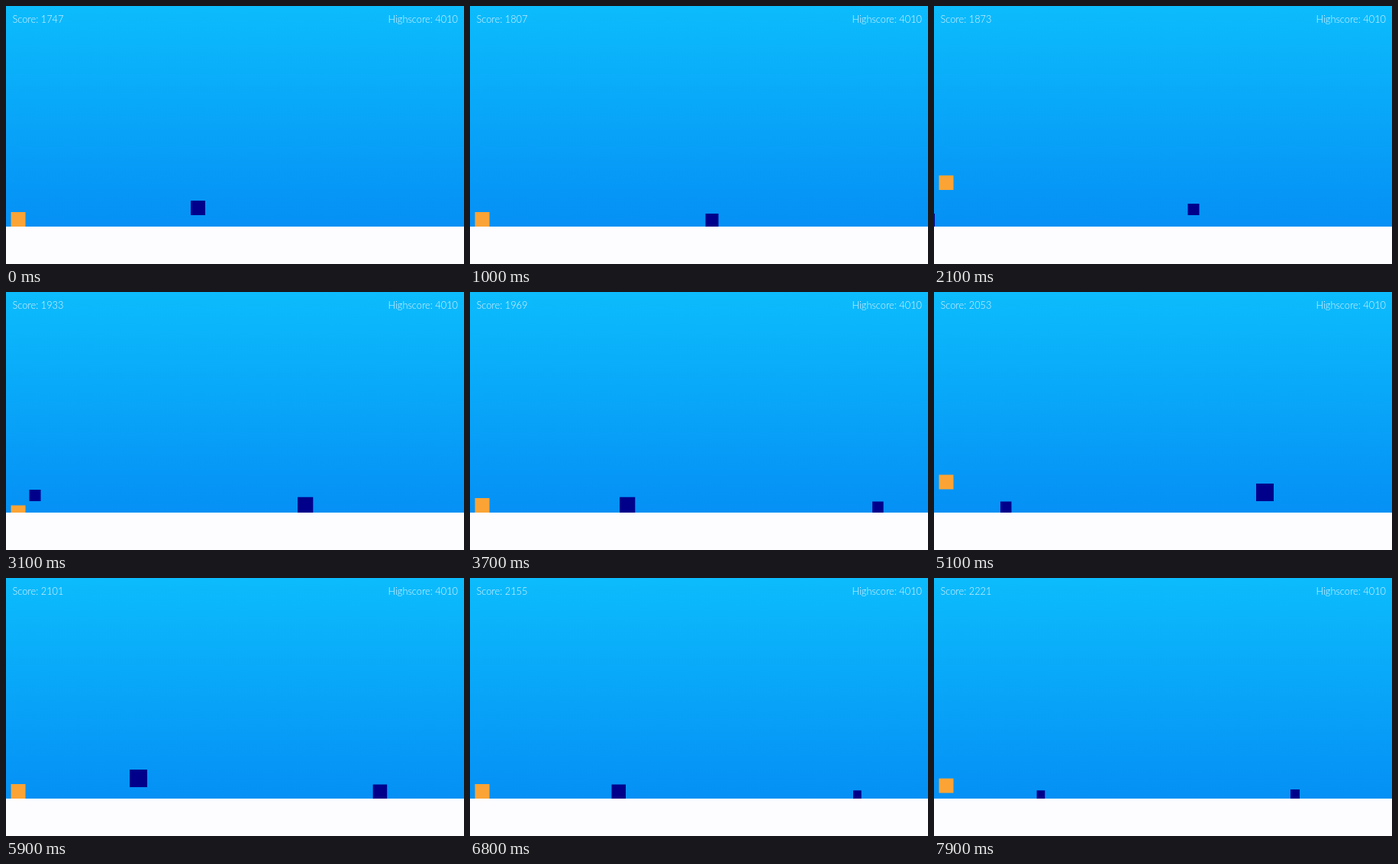
Animation, 600 px wide and 338 px high, one loop 8 s. Source, as an HTML page with a canvas:

```html
<!DOCTYPE html>
<html lang="en">
<head>
<meta charset="utf-8">
<title>Block runner</title>
<style>
  html, body { margin: 0; width: 100%; height: 100%; overflow: hidden; }
  canvas { position: absolute; left: 0; top: 0; }
  p {
    position: absolute; top: 8px; margin: 0;
    font: 300 12.8px/18px Lato, sans-serif;
    color: #e4f5ff; white-space: pre;
  }
  #score { left: 8.5px; }
  #best { right: 8px; }
  #stage { position: relative; width: 600px; height: 338px; overflow: hidden; }
</style>
</head>
<body>
<div id="stage">
  <canvas id="view" width="600" height="338"></canvas>
  <p id="score"></p>
  <p id="best">Highscore: 4010</p>
</div>
<script>
const LOOP = 8000, STEP = 100;
const W = 600, H = 338, GROUND = 289, HOVER = 274;
const PLAYER = { x: 6.5, size: 19 };
const JUMP = { height: 78, time: 0.7 };

// Each block keeps the speed it was spawned with: x at time t, px per second.
const blocks = [
  { t: 0,   x: 242,   size: 19,   speed: 290, base: HOVER },
  { t: 2.1, x: -16,   size: 17,   speed: 295, base: GROUND },
  { t: 2.1, x: 332.5, size: 15,   speed: 302, base: HOVER },
  { t: 3.1, x: 382,   size: 20.3, speed: 310, base: GROUND },
  { t: 4.3, x: 338.5, size: 14.5, speed: 314.4, base: GROUND },
  { t: 5.1, x: 422,   size: 23,   speed: 325, base: HOVER },
  { t: 6.8, x: 185.5, size: 18.5, speed: 328, base: GROUND },
  { t: 6.8, x: 502,   size: 10.7, speed: 334, base: GROUND },
  { t: 7.9, x: 467,   size: 12,   speed: 340, base: GROUND }
];
const jumps = [1.533, 3.881, 5.023, 6.95, 7.883];
const ducks = [[0.62, 0.9], [2.95, 3.22], [6.15, 6.5]];

const ctx = document.getElementById("view").getContext("2d");
const score = document.getElementById("score");

const sky = ctx.createLinearGradient(0, 0, 0, GROUND);
sky.addColorStop(0, "#0cbcfc");
sky.addColorStop(1, "#0590f5");

function rect(color, x, y, w, h) {
  ctx.fillStyle = color;
  ctx.fillRect(x, y, w, h);
}

function lift(t) {
  const start = jumps.find(s => t >= s && t < s + JUMP.time);
  if (start === undefined) return 0;
  const p = (t - start) / JUMP.time;
  return 4 * JUMP.height * p * (1 - p);
}

function draw(t) {
  rect(sky, 0, 0, W, GROUND);
  for (const b of blocks) {
    const x = b.x - b.speed * (t - b.t);
    if (x < W && x + b.size > 0) rect("#00008b", x, b.base - b.size, b.size, b.size);
  }
  const ducking = ducks.some(([from, to]) => t >= from && t < to);
  const h = ducking ? PLAYER.size / 2 : PLAYER.size;
  rect("#fba435", PLAYER.x, GROUND - h - lift(t), PLAYER.size, h);
  rect("#fdfdff", 0, GROUND, W, H - GROUND);
  score.textContent = "Score: " + (1747 + Math.round(t * 60));
}

const begin = performance.now();
function frame() {
  const ms = (performance.now() - begin) % LOOP;
  draw(Math.floor(ms / STEP) * STEP / 1000);
  requestAnimationFrame(frame);
}
frame();
</script>
</body>
</html>
```
